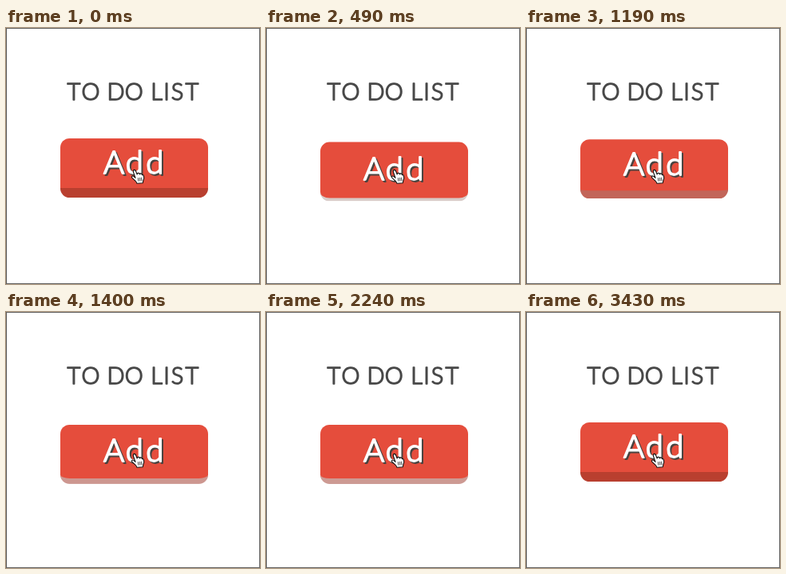
Animation of 318 by 320 pixels, one loop 3.5 s. Source, as an HTML page:

```html
<!DOCTYPE html>
<html lang="en">
<head>
<meta charset="utf-8">
<title>To do list</title>
<style>
  @property --press {
    syntax: "<number>";
    inherits: true;
    initial-value: 0;
  }

  html, body {
    margin: 0;
    width: 100%;
    height: 100%;
    overflow: hidden;
    background: #fff;
  }

  .stage {
    position: relative;
    box-sizing: border-box;
    width: 318px;
    height: 320px;
    overflow: hidden;
    background: #fff;
    animation: press 3500ms step-end infinite;
  }

  .frame {
    position: absolute;
    inset: 0;
    border: 1px solid #666;
    border-left-color: #555;
  }

  .button {
    position: absolute;
    box-sizing: border-box;
    left: 68.4px;
    top: 137.6px;
    width: 184.8px;
    height: 74px;
    border-radius: 11.5px;
    background: #e54d3c;
    border-bottom: calc(12px - 7.5px * var(--press)) solid
      rgb(calc(185 + 33 * var(--press)) calc(63 + 147 * var(--press)) calc(47 + 161 * var(--press)));
    transform: translateY(calc(4.8px * var(--press)));
  }

  svg {
    position: absolute;
    left: 0;
    top: 0;
  }

  text {
    font-family: Lato, "Open Sans", sans-serif;
    font-weight: 300;
    text-anchor: middle;
    stroke-linejoin: round;
  }

  .title {
    font-size: 29px;
    fill: #484848;
    stroke: #484848;
    stroke-width: 1.5px;
  }

  .label {
    transform: translateY(calc(8.3px * var(--press)));
    filter: drop-shadow(2px 2px 0 #484340);
  }

  .label text {
    font-size: 40px;
    fill: #fff;
    stroke: #fff;
    stroke-width: 1.9px;
  }

  .hand {
    fill: #fff;
    stroke: #111;
    stroke-width: 1.1px;
    stroke-linejoin: round;
    stroke-linecap: round;
    animation: drift 3500ms step-end infinite;
  }

  @keyframes press {
    0%  { --press: 0; }
    8%  { --press: .3; }
    10% { --press: .85; }
    12% { --press: 1; }
    14% { --press: .95; }
    16% { --press: 0; }
    28% { --press: .6; }
    30% { --press: 1; }
    32% { --press: .85; }
    34% { --press: .26; }
    36% { --press: 0; }
    40% { --press: .6; }
    42% { --press: 1; }
    44% { --press: .9; }
    46% { --press: .26; }
    48% { --press: 0; }
    64% { --press: .62; }
    66% { --press: 1; }
    68% { --press: .9; }
    70% { --press: .26; }
    72%, 100% { --press: 0; }
  }

  @keyframes drift {
    0%  { transform: none; }
    54% { transform: translate(9px, -4px); }
    56% { transform: translate(18px, -8px); }
    58%, 100% { transform: none; }
  }
</style>
</head>
<body>
<div class="stage">
  <svg width="318" height="320">
    <text class="title" x="85 106 120 137.5 160.3 176 188.5 201 214.5 233" y="90.2">TO DO LIST</text>
  </svg>
  <div class="button"></div>
  <svg class="label" width="318" height="320">
    <text x="135.2 160.8 186.2" y="182">Add</text>
  </svg>
  <svg width="318" height="320">
    <g class="hand">
      <path d="M162 187.5 L159.4 180 Q158.9 177.6 160.6 177.4 Q162 177.3 162.7 179.3
        L164.2 183 Q164.4 181.2 166 181.4 Q167.2 181.6 167.5 182.9 Q168 181.6 169.2 182
        Q170.3 182.4 170.5 183.8 Q171.9 183.1 172.4 184.8 Q173.3 188 171.9 190.4 L171.2 193.8
        L164 194.3 Q163.4 192.4 161.2 190.4 L157.9 187.3 Q156.8 185.6 158.4 185 Q159.8 184.8 162 187.5 Z"/>
      <path fill="none" stroke-width=".8" d="M165.4 187.6 L165.8 191.2 M167.6 187.4 L167.8 191 M169.7 187.2 L169.8 190.8"/>
    </g>
  </svg>
  <div class="frame"></div>
</div>
</body>
</html>
```
